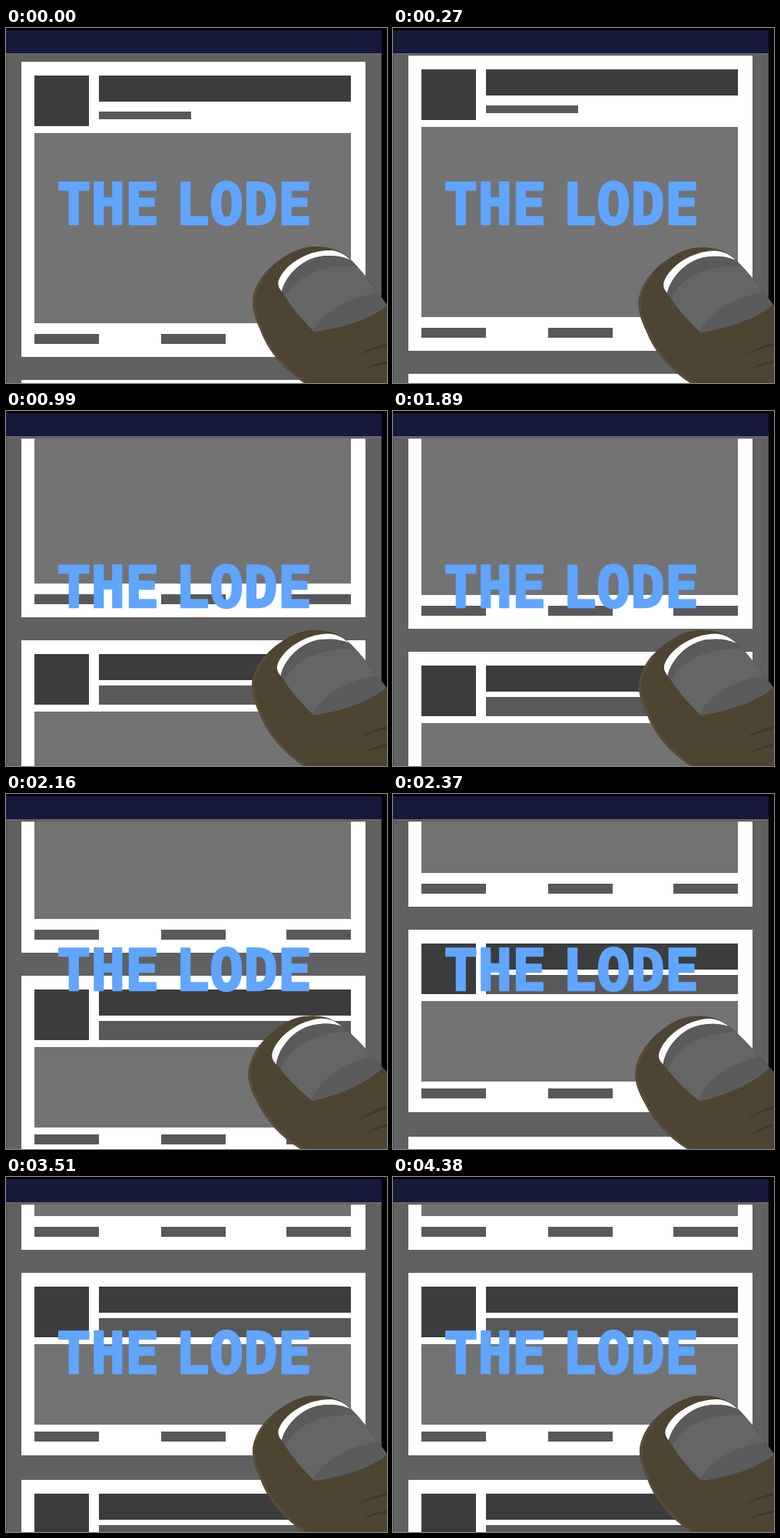
An HTML page for the animation above (4410 ms loop, 496 px wide and 463 px high).

```html
<!DOCTYPE html>
<html lang="en">
<head>
<meta charset="utf-8">
<title>Scrolling feed</title>
<style>
  html, body { margin: 0; width: 100%; height: 100%; overflow: hidden; background: #000; }
  svg { display: block; width: 496px; height: 463px; }
  rect { shape-rendering: crispEdges; }
  .title {
    font: bold 74px "DejaVu Sans Mono", monospace;
    fill: #60a5ff; stroke: #60a5ff; stroke-width: 2.5; stroke-linejoin: round;
  }
</style>
</head>
<body>
<svg viewBox="0 0 496 463">
  <defs>
    <clipPath id="screen"><rect y="36" width="489" height="427"/></clipPath>
    <clipPath id="nailClip"><use href="#nail"/></clipPath>
  </defs>
  <rect width="496" height="463"/>
  <rect y="33" width="489" height="430" fill="#616161"/>
  <rect y="33" width="1" height="430" fill="#484848"/>
  <rect x="488" y="33" width="1" height="430" fill="#505050"/>
  <rect y="3" width="489" height="30" fill="#17193b"/>
  <rect y="33" width="489" height="1" fill="#777"/>
  <g clip-path="url(#screen)"><g id="feed"></g></g>
  <g class="title">
    <text x="66" y="256">THE</text>
    <text x="220.2" y="256">LODE</text>
  </g>
  <g id="thumb">
    <path fill="#4d4432" d="M388 463 C360 444 340 419 331 394 C326 383 321 370 321 357
      C322 335 340 313 357 302 C372 291 388 285 402 285 C424 285 437 291 449 302
      C465 318 482 342 497 362 L570 455 L570 540 L480 540 Z"/>
    <path fill="none" stroke="#5c4b39" stroke-width="3" d="M389 462 C361 443 342 419 333 394
      C328 383 322.500 370 322.500 357 C323 343 331 328 341 317"/>
    <path fill="#fff" d="M362 346 C356 342 353 335 355 329 C362 309 393 289 423 290
      C434 291 442 296 449 303 L440 312 Z"/>
    <path id="nail" fill="#656565" d="M359 343 C365 321 387 300 412 297.500 C426 296 439 298 449 303
      C465 318 482 342 496 362 C471 382 432 392 401 396 C384 379 369 361 359 343 Z"/>
    <g clip-path="url(#nailClip)" fill="#5b5b5b">
      <path d="M350 355 L364 351 C374 327 408 307 458 311 L455 290 L350 290 Z"/>
      <path d="M398 396 C415 367 449 349 491 345 L510 370 L400 405 Z"/>
    </g>
    <g fill="#40382a">
      <path d="M459 427 C471 418 488 413 510 409 L510 414 C490 416 474 420 459 427 Z"/>
      <path d="M465 446 C476 438 491 435 510 433 L510 437 C492 438 479 441 465 446 Z"/>
    </g>
  </g>
</svg>
<script>
const LOOP = 4410, STEP = 30;
const DARK = "#3c3c3c", MID = "#595959", PHOTO = "#737373";
const feed = document.getElementById("feed");
const thumb = document.getElementById("thumb");

function box(x, y, width, height, fill) {
  const rect = document.createElementNS("http://www.w3.org/2000/svg", "rect");
  for (const [key, value] of Object.entries({ x, y, width, height, fill })) {
    rect.setAttribute(key, value);
  }
  feed.append(rect);
}

function card(y, height, photoHeight, buttonTop, subtitle) {
  box(20, y, 448, height, "#fff");
  box(37, y + 18, 71, 66, DARK);
  box(121, y + 18, 328, 34, DARK);
  box(121, y + subtitle.top, subtitle.width, subtitle.height, MID);
  box(37, y + 93, 412, photoHeight, PHOTO);
  for (const x of [37, 202, 365]) box(x, y + buttonTop, 84, 13, MID);
}

const shortSubtitle = { top: 65, width: 120, height: 10 };
const wideSubtitle = { top: 59, width: 328, height: 25 };
card(44, 385, 248, 355, shortSubtitle);
card(459, 238, 105, 207, wideSubtitle);
card(729, 238, 105, 207, wideSubtitle);

const clamp = v => Math.min(1, Math.max(0, v));
const progress = (t, from, to) => clamp((t - from) / (to - from));
const smooth = v => v * v * (3 - 2 * v);
const cubic = v => v < 0.5 ? 4 * v ** 3 : 1 - 4 * (1 - v) ** 3;

// Each swipe drags past its resting point, then settles back.
const scrollKeys = [
  [0, 0], [240, 0], [900, 174], [1080, 145],
  [1890, 145], [2730, 385], [2900, 334], [LOOP, 334]
];

function scrollAt(t) {
  const i = scrollKeys.findIndex(([time]) => t < time);
  const [t0, s0] = scrollKeys[i - 1], [t1, s1] = scrollKeys[i];
  return Math.round(s0 + (s1 - s0) * (t - t0) / (t1 - t0));
}

function swipe(t) {
  return cubic(progress(t, 0, 600)) * (1 - smooth(progress(t, 690, 1060)));
}

function draw(now) {
  const t = Math.floor(now % LOOP / STEP) * STEP;
  const bend = swipe(t - 30) + swipe(t - 1680);
  feed.setAttribute("transform", `translate(0 ${-scrollAt(t)})`);
  thumb.setAttribute("transform", `rotate(${-5.8 * bend} 445 420)`);
}

function tick() {
  draw(performance.now());
  requestAnimationFrame(tick);
}
tick();
</script>
</body>
</html>
```
